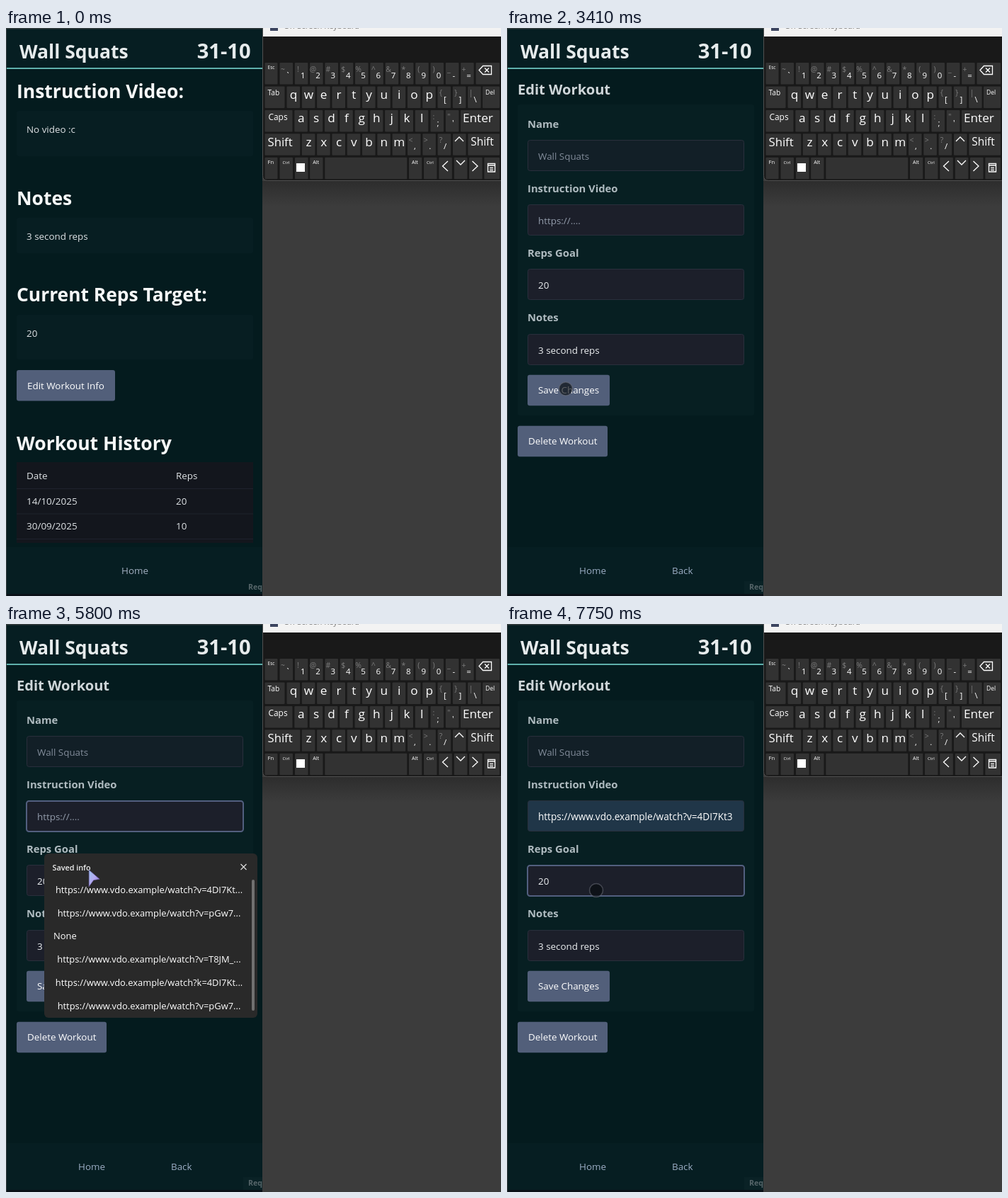
Write an HTML page that moves like this. It is 699x802 px and loops after 8000 ms.

```html
<!DOCTYPE html>
<html lang="en">
<head>
<meta charset="utf-8">
<title>Workout editor</title>
<style>
html, body { margin: 0; width: 100%; height: 100%; overflow: hidden; background: #3c3c3c; }
svg { display: block; width: 699px; height: 802px; }
text { font-family: "Open Sans", "Noto Sans", sans-serif; white-space: pre; }
</style>
</head>
<body>
<svg id="stage" viewBox="0 0 699 802" xmlns="http://www.w3.org/2000/svg"></svg>
<script>
const LOOP = 8000;
const SITE = 'https://www.vdo.example/watch?';
const LINK = SITE + 'v=4DI7Kt3';

const esc = s => s.replace(/&/g, '&amp;').replace(/</g, '&lt;');
const text = (x, y, s, size = 13.4, fill = '#dfe3e6', more = '') =>
  `<text x="${x}" y="${y}" font-size="${size}" fill="${fill}" ${more}>${esc(s)}</text>`;
const bold = (x, y, s, size, fill = '#f6f8f8', more = '') =>
  text(x, y, s, size, fill, 'font-weight="700" ' + more);
const box = (x, y, w, h, fill, more = '') =>
  `<rect x="${x}" y="${y}" width="${w}" height="${h}" fill="${fill}" ${more}/>`;
const line = (d, color = '#fff', w = 1.3, more = '') =>
  `<path d="${d}" fill="none" stroke="${color}" stroke-width="${w}" ${more}/>`;
const button = (x, y, w, label) =>
  box(x, y, w, 43.5, '#525f7a', 'rx="3"') + text(x + 15, y + 26.7, label, 13.4, '#fff');
const field = (y, fill, id = '') =>
  box(29.5, y, 305, 43, fill, `rx="3" stroke="#292f3c" ${id && `id="${id}"`}`);
const ring = (y, id) =>
  box(29, y + 0.5, 306, 43, 'none', `rx="3.5" stroke="#525f7f" stroke-width="2" id="${id}"`);

// ---- on-screen keyboard ----
const PITCH = 21.3, KEY_W = 18.6;
const key = (x, y, w = KEY_W) => box(x, y, w, 30.5, '#323232', 'rx="1"');
const mid = 'text-anchor="middle"';

function pairKey(x, y, pair, dx, dy) {
  return key(x, y) + text(x + 4.5, y + 12.6, pair[0], 10.5, '#7c7c7c', mid) +
    text(x + dx, y + dy, pair[1], 11.5, '#fff', mid);
}
function letterKeys(x, y, letters) {
  return [...letters].map((c, i) => key(x + i * PITCH, y) +
    text(x + i * PITCH + 9.6, y + 17.4, c, 17.2, '#fff', mid)).join('');
}
function pairKeys(x, y, pairs, dx = 10.5, dy = 22) {
  return pairs.split(' ').map((p, i) => pairKey(x + i * PITCH, y, p, dx, dy)).join('');
}
function wideKey(x, y, end, label, size, dy, pad = 4) {
  return key(x, y, end - x) + text(x + pad, y + dy, label, size, '#fff');
}
function keyboard() {
  const rows = [49, 82.5, 116, 149.3, 182.7];
  const [a, b, c, d, e] = rows;
  return box(362, 216, 337, 36, 'url(#shade)') +
    '<path d="M362.5 0H700V215.5H369.5Q362.5 215.5 362.5 208.5Z" fill="#191919" stroke="#505050"/>' +
    box(363, 0, 336, 12, '#f3f3f3') + box(373, 0, 11, 4, '#3c4560') +
    text(392, 1, 'On-Screen Keyboard', 11.2, '#777') +
    wideKey(365.5, a, 383.5, 'Esc', 6.6, 9) +
    pairKeys(386.5, a, '~` !1 @2 #3 $4 %5 ^6 &7 *8 (9 )0 _- +=', 11.5, 22) +
    key(663.5, a, 33.5) +
    line('M668 59.5L673.5 53.5H685.5V65.5H673.5ZM676 56.5L682 62.5M682 56.5L676 62.5') +
    wideKey(365.5, b, 393.5, 'Tab', 10.2, 12) + letterKeys(396.5, b, 'qwertyuiop') +
    pairKeys(609.5, b, '{[ }] |\\') + wideKey(673, b, 697, 'Del', 8.6, 11) +
    wideKey(365.5, c, 404.5, 'Caps', 11.9, 13.5, 5) + letterKeys(407.3, c, 'asdfghjkl') +
    pairKeys(599.5, c, ':; "\'') + wideKey(642, c, 697, 'Enter', 17.2, 17.4, 3) +
    wideKey(365.5, d, 415.3, 'Shift', 16.7, 17.4) + letterKeys(417.8, d, 'zxcvbnm') +
    pairKeys(567, d, '<, >. ?/') + key(631, d) + line('M634 160L640 154L646 160') +
    wideKey(652.3, d, 697, 'Shift', 15.4, 16.6) +
    wideKey(365.5, e, 383.5, 'Fn', 7.6, 9.5) + wideKey(386.5, e, 405, 'Ctrl', 6, 9) +
    key(408, e) + box(410, 191, 12, 12, '#fff') +
    wideKey(429.2, e, 447.5, 'Alt', 7.2, 9) + key(450.3, e, 116) +
    wideKey(569, e, 587.3, 'Alt', 7.2, 9) + wideKey(590, e, 608.5, 'Ctrl', 6, 9) +
    key(611.3, e) + key(632.8, e) + key(654, e) + key(675.3, e, 21.7) +
    line('M624 188L616.5 195L624 202M636 187L642 193L648 187M658.5 188L666 195L658.5 202') +
    line('M680.5 191.5H690.5V203H680.5ZM680.5 194H690.5M683 197.5H688M683 200.5H688');
}

// ---- app pages ----
function infoPage() {
  const card = (y, h) => box(15, y, 334, h, '#071e22', 'rx="3"');
  const row = (y, day, reps) => text(29, y, day, 13.5) + text(240, y, reps, 13.4) +
    box(15, y + 13, 334, 1, '#1f222d');
  return bold(15, 99, 'Instruction Video:', 26.5) + card(117, 64) + text(29, 147.5, 'No video :c') +
    bold(15, 250, 'Notes', 26.5) + card(268, 50) + text(29, 299, '3 second reps') +
    bold(15, 386, 'Current Reps Target:', 26.4) + card(405, 63) + text(29, 435.5, '20') +
    button(15, 483, 139, 'Edit Workout Info') +
    bold(15, 595.5, 'Workout History', 26.6) + box(15, 613, 334, 114, '#13161d') +
    row(637, 'Date', 'Reps') + row(672.5, '14/10/2025', '20') + row(708, '30/09/2025', '10') +
    text(163, 771, 'Home', 13.4, '#a3b0c2');
}
function editPage() {
  const label = (y, s) => bold(29, y, s, 14.8, '#afbbc0');
  return bold(15, 93.5, 'Edit Workout', 20.1, '#cfd6d9') + box(15, 108, 334, 439, '#071f22', 'rx="3"') +
    label(140.5, 'Name') + field(158.5, '#121f27') + text(44, 186, 'Wall Squats', 13.4, '#828c9a') +
    label(231.5, 'Instruction Video') + field(249.5, '#1c1f2a', 'urlBox') + ring(249.5, 'urlRing') +
    text(44, 277, 'https://....', 13.4, '#929baa', 'id="hint"') +
    text(44, 276.5, LINK, 13.55, '#fff', 'id="link"') + box(44, 263, 1, 19, '#ddd', 'id="urlCaret"') +
    label(322.5, 'Reps Goal') + field(340.5, '#1c1f2a') + ring(340.5, 'repsRing') +
    text(44, 368, '20', 13.4, '#eceff1') + box(59, 353, 1, 19, '#ddd', 'id="repsCaret"') +
    label(414, 'Notes') + field(432.5, '#1c1f2a') + text(44, 459.5, '3 second reps', 13.4, '#eceff1') +
    button(29, 489.7, 116, 'Save Changes') + button(15, 561.7, 127, 'Delete Workout') +
    text(102, 771, 'Home', 13.4, '#9badc4') + text(233, 771, 'Back', 13.4, '#9badc4') +
    box(335, 781, 27, 18, '#0a2226');
}
function savedList() {
  const rows = ['v=4DI7Kt...', 'v=pGw7...', '', 'v=T8JM_...', 'k=4DI7Kt...', 'v=pGw7...'];
  return box(54, 324, 301, 232, '#292929', 'rx="6"') +
    box(58, 360, 286, 32, '#383838', 'rx="4" id="rowGlow"') +
    text(65.5, 347.5, 'Saved info', 10.8, '#f0f0f0', 'font-weight="600"') +
    line('M331.5 339L339.5 347M339.5 339L331.5 347', '#ddd', 1.2) +
    rows.map((id, i) => {
      const y = 380 + i * 32.7;
      return id ? text(202, y, SITE + id, 12.9, '#fff', mid) : text(67, y, 'None', 12.9, '#fff');
    }).join('') + box(347, 361, 4, 185, '#707070', 'rx="2"');
}

const stage = document.getElementById('stage');
stage.innerHTML = `<defs>
  <linearGradient id="shade" x2="0" y2="1"><stop stop-color="#2d2d2d"/><stop offset="1" stop-color="#3c3c3c"/></linearGradient>
  <linearGradient id="tint" x2="1" y2="1"><stop stop-color="#9cc4ee"/><stop offset=".5" stop-color="#b3a9f0"/><stop offset="1" stop-color="#8066c8"/></linearGradient>
  <clipPath id="app"><path d="M0 0H362V802H0Z"/></clipPath>
  </defs>` + box(0, 0, 699, 802, '#3c3c3c') + keyboard() +
  box(0, 0, 362, 802, '#041b1e') + box(0, 0, 362, 57, '#061e22') +
  box(0, 733, 362, 66, '#061e22') +
  box(0, 0, 362, 1.5, '#343d3f') + box(0, 0, 1, 802, '#343d3f') +
  box(1, 56, 361, 2, '#5fb0ac') + box(1, 799, 361, 3, '#0a1118') +
  bold(19, 43, 'Wall Squats', 26.5, '#e6ebec') +
  bold(345.5, 43, '31-10', 29.1, '#e6ebec', 'text-anchor="end"') +
  `<g id="info">${infoPage()}</g><g id="edit">${editPage()}</g>` +
  `<g clip-path="url(#app)">${bold(342, 793, 'Request', 10.6, '#57666a')}</g>` +
  `<g id="saved">${savedList()}</g>
  <path id="arrow" d="M1.5 0L16.5 13L8 14.5L1.5 23.5Z" fill="url(#tint)" stroke="#6a5aa0" stroke-width=".6" stroke-linejoin="round"/>
  <circle id="dot" r="9.5" fill="#080c10" fill-opacity=".65" stroke="#6b707a" stroke-opacity=".55" stroke-width="1.5"/>`;

// ---- motion ----
const el = id => document.getElementById(id);
const show = (id, on) => el(id).setAttribute('visibility', on ? 'visible' : 'hidden');
const ramp = (t, a, b) => Math.min(1, Math.max(0, (t - a) / (b - a)));

// time, x, y of the pointer
const PATH = [
  [260, 580, 790], [330, 350, 715], [390, 170, 635], [460, 72, 571],
  [600, 71, 568], [740, 32, 536], [870, 27, 512], [1000, 95, 514], [1080, 142, 512], [1210, 83, 510],
  [3410, 83, 510], [3545, 75, 440], [3680, 104, 230], [3780, 112, 120], [3850, 95, 96],
  [3980, 46, 190], [4080, 56, 300], [4200, 87, 385], [4280, 87, 375], [4550, 98, 268],
  [5060, 98, 268], [5140, 94, 280], [5420, 94, 280], [5930, 123, 370],
  [6670, 123, 370], [6780, 170, 374], [6940, 126, 376]
];
function pointerAt(t) {
  let i = PATH.findIndex(p => p[0] > t);
  if (i < 0) i = PATH.length;
  const p = PATH[Math.max(0, i - 1)], q = PATH[i] || p;
  const k = q === p ? 0 : ramp(t, p[0], q[0]);
  return [p[1] + (q[1] - p[1]) * k, p[2] + (q[2] - p[2]) * k];
}

// left, top, right, bottom of clickable parts
const INFO_HITS = [[15, 483, 154, 527]];
const EDIT_HITS = [[29, 249, 335, 293], [29, 340, 335, 385], [29, 432, 335, 476], [29, 489, 145, 534]];
const hit = (list, x, y) => list.some(([l, t, r, b]) => x > l && x < r && y > t && y < b);

function draw(t) {
  const edit = t >= 1530;
  show('info', !edit);
  show('edit', edit);

  const [x, y] = pointerAt(t);
  const open = t >= 5280 && t < 6400;
  const idle = (t >= 1530 && t < 3405) || (t >= 6140 && t < 6680) || (open && y > 324);
  const dot = !idle && hit(edit ? EDIT_HITS : INFO_HITS, x, y);
  show('arrow', t >= 260 && !dot);
  show('dot', t >= 260 && dot);
  el('arrow').setAttribute('transform', `translate(${x} ${y})`);
  el('dot').setAttribute('transform', `translate(${x} ${y})`);

  const shown = Math.min(ramp(t, 5240, 5390), 1 - ramp(t, 6140, 6400) ** 1.4);
  const s = 0.95 + 0.05 * shown;
  show('saved', open);
  el('saved').setAttribute('opacity', shown);
  el('saved').setAttribute('transform', `translate(204.5 440) scale(${s}) translate(-204.5 -440)`);

  const picked = t >= 5400 && y > 358;
  show('rowGlow', open && picked);
  show('link', picked);
  show('hint', edit && !picked);
  el('urlBox').setAttribute('fill', picked ? '#203648' : '#1c1f2a');
  el('urlRing').setAttribute('opacity', Math.min(ramp(t, 5280, 5550), 1 - ramp(t, 7090, 7300)));
  el('repsRing').setAttribute('opacity', ramp(t, 7090, 7300));
  show('urlCaret', t >= 5280 && t < 5780);
  show('repsCaret', t >= 7250 && t < 7750);
}

const start = performance.now();
function tick() {
  draw((performance.now() - start) % LOOP);
  requestAnimationFrame(tick);
}
tick();
</script>
</body>
</html>
```
